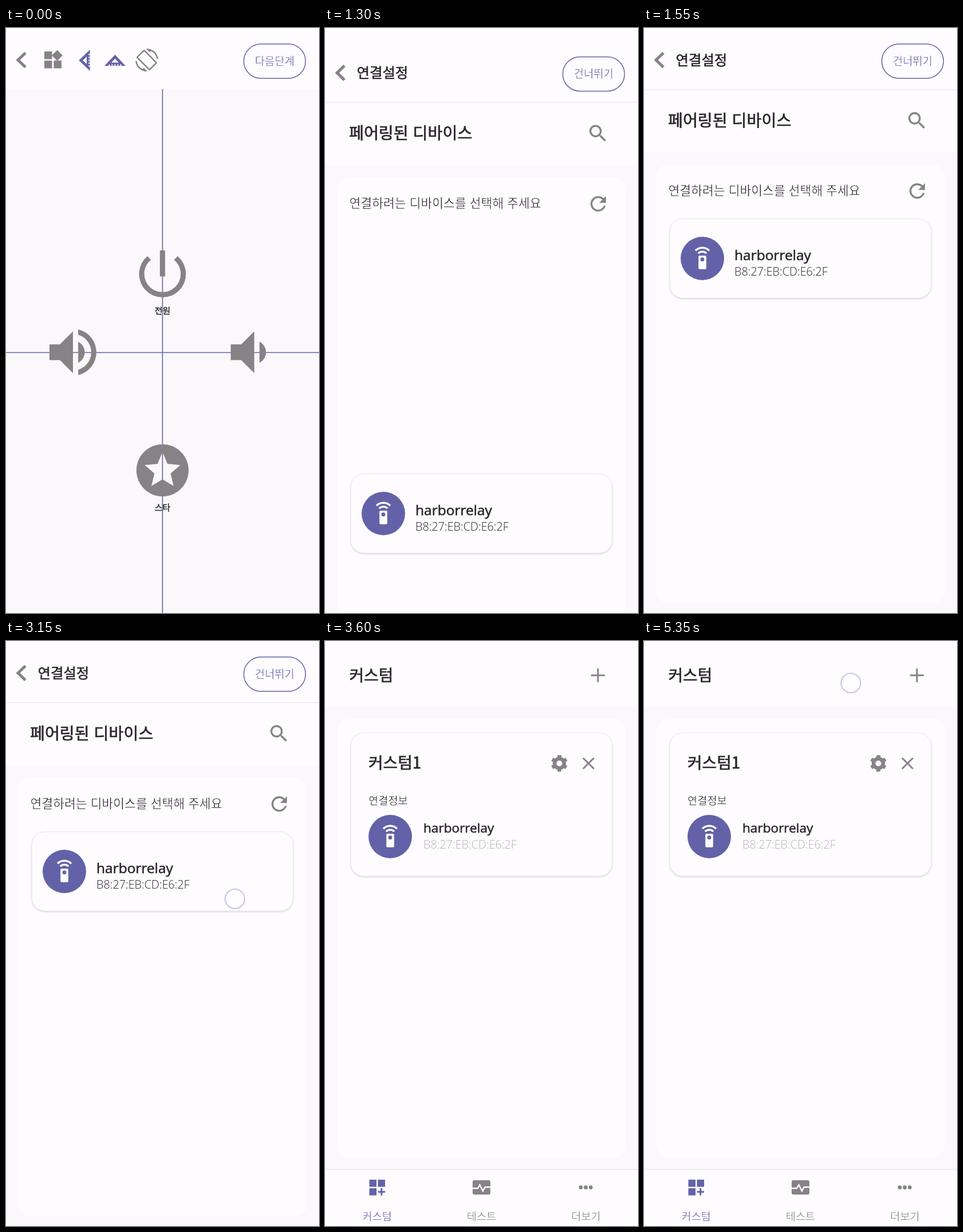
An HTML page for the animation above (5.4 s loop, 547 by 1023 pixels).

```html
<!DOCTYPE html>
<html lang="ko">
<head>
<meta charset="utf-8">
<style>
  html, body { margin: 0; height: 100%; overflow: hidden; background: #faf8fb; }
  svg { display: block; width: 100vw; height: 100vh; }
  text { font-family: 'Noto Sans CJK KR', 'Noto Sans CJK', 'Noto Sans', sans-serif; }
  .latin { font-family: 'Open Sans', 'Noto Sans', sans-serif; }
  .card { fill: #fefcff; stroke: #efedf2; filter: drop-shadow(0 1.5px 1.5px #0003); }
  .bar { fill: #fefcff; filter: drop-shadow(0 0 1.5px #0003); }
  .line { fill: none; stroke: #858385; }
  .pressed { filter: drop-shadow(0 2px 3px #0003); }
</style>
</head>
<body>
<svg id="stage" viewBox="0 0 547 1023" preserveAspectRatio="none"></svg>
<script>
const GREY = '#858385', PURPLE = '#6362a8', WHITE = '#fefcff', BACK = '#faf8fb', INK = '#29272b';

// Icon outlines on a 24 unit grid
const ICONS = {
  power: 'M13 3h-2v10h2zm4.83 2.17-1.42 1.42C17.99 7.86 19 9.81 19 12a7 7 0 0 1-14 0c0-2.19 1.01-4.14 2.58-5.42L6.17 5.17A9 9 0 1 0 17.83 5.17z',
  loud: 'M3 9v6h4l5 5V4L7 9zm13.5 3c0-1.77-1.02-3.29-2.5-4.03v8.05c1.48-.73 2.5-2.25 2.5-4.02zM14 3.23v2.06a7 7 0 0 1 0 13.42v2.06a9 9 0 0 0 0-17.54z',
  quiet: 'M18.5 12c0-1.77-1.02-3.29-2.5-4.03v8.05c1.48-.73 2.5-2.25 2.5-4.02zM5 9v6h4l5 5V4L9 9z',
  star: 'M12 2a10 10 0 1 0 0 20a10 10 0 1 0 0-20zm4.23 16L12 15.45 7.77 18l1.12-4.81-3.73-3.23 4.92-.42L12 5l1.92 4.53 4.92.42-3.73 3.23z',
  remote: 'M15 9H9q-1 0-1 1v12q0 1 1 1h6q1 0 1-1V10q0-1-1-1zm-3 6a2 2 0 1 1 0-4a2 2 0 1 1 0 4zM7.05 6.05l1.41 1.41a5 5 0 0 1 7.08 0l1.41-1.41a7 7 0 0 0-9.9 0zM12 0C8.96 0 6.21 1.23 4.22 3.22l1.41 1.41a9 9 0 0 1 12.73 0l1.41-1.41C17.79 1.23 15.04 0 12 0z',
  search: 'M15.5 14h-.79l-.28-.27A6.5 6.5 0 1 0 13.73 14.43l.27.28v.79l5 4.99L20.49 19zm-6 0a4.5 4.5 0 1 1 0-9a4.5 4.5 0 1 1 0 9z',
  refresh: 'M17.65 6.35A8 8 0 1 0 19.73 14h-2.08A6 6 0 1 1 16.22 7.78L13 11h7V4z',
  rotate: 'M16.48 2.52A10.5 10.5 0 0 1 22.45 11h1.5A12 12 0 0 0 12 0l-.66.03 3.81 3.81zM10.23 1.75a1.5 1.5 0 0 0-2.12 0L1.75 8.11a1.5 1.5 0 0 0 0 2.12l12.02 12.02a1.5 1.5 0 0 0 2.12 0l6.36-6.36a1.5 1.5 0 0 0 0-2.12zm4.6 19.44L2.81 9.17l6.36-6.36 12.02 12.02zM7.52 21.48A10.5 10.5 0 0 1 1.55 13H.05A12 12 0 0 0 12 24l.66-.03-3.81-3.81z',
  ruler: 'M12 2 31 22H-7zm0 7L5.4 16.2H18.6z'
};

const rect = (x, y, w, h, fill, extra = '') =>
  `<rect x="${x}" y="${y}" width="${w}" height="${h}" fill="${fill}" ${extra}/>`;
const stroke = (d, width, color = GREY) => `<path class="line" d="${d}" style="stroke:${color};stroke-width:${width}"/>`;
const icon = (name, cx, cy, scale, color = GREY) =>
  `<path d="${ICONS[name]}" fill="${color}" fill-rule="evenodd" transform="translate(${cx} ${cy}) scale(${scale}) translate(-12 -12)"/>`;

// An outline in ink thickens the regular face, one in the background colour thins it
const text = (str, x, y, size, weight, color = INK, extra = '') => {
  const [edge, width] = weight > 400 ? [color, size * .025] : weight < 400 ? [WHITE, size * .02] : ['none', 0];
  return `<text x="${x}" y="${y}" font-size="${size}" fill="${color}" stroke="${edge}" stroke-width="${width}" ${extra}>${str}</text>`;
};
const centered = (str, x, y, size, weight, color) => text(str, x, y, size, weight, color, 'text-anchor="middle"');
const hostName = (x, y, size) => text('harborrelay', x, y, size, 500, INK, 'class="latin"');
const address = (x, y, color) => text('B8:27:EB:CD:E6:2F', x, y, 19.8, 400, color, 'class="latin" font-weight="300"');
const card = (y, h) => `<rect class="card" x="45.5" y="${y}" width="456" height="${h}" rx="22"/>`;
const panel = y => rect(21.5, y, 504, 767, WHITE, 'rx="22"');

const backArrow = stroke('M34 43.5 21 56 34 68.5', 5);
const button = (label, id) =>
  `<g id="${id}"><rect x="415.5" y="28" width="108" height="60" rx="30" fill="${WHITE}" stroke="${PURPLE}" stroke-width="1.5"/></g>`
  + centered(label, 469.5, 64.5, 18.8, 300, PURPLE);
const device = (x, y) => `<circle cx="${x}" cy="${y}" r="38" fill="${PURPLE}"/>` + icon('remote', x, y, 1.7, WHITE);

const ruler = (cx, cy, angle) => `<g transform="translate(${cx} ${cy}) rotate(${angle})">`
  + icon('ruler', 0, 0, .97, PURPLE)
  + [-10, -5, 0, 5, 10].map(x => rect(x - 1, 7, 2, 3, WHITE)).join('') + '</g>';

const editor = rect(0, 0, 547, 1023, BACK) + rect(0, 0, 547, 107, WHITE) + backArrow
  + rect(67, 41, 13.5, 13.5, GREY) + rect(67, 57, 13.5, 13.5, GREY) + rect(83.5, 57, 13.5, 13.5, GREY)
  + `<path d="M89.5 38.5 99 48 89.5 57.5 80 48z" fill="${GREY}"/>`
  + ruler(137, 56.5, -90) + ruler(190.5, 56.5, 0) + icon('rotate', 246, 56, 1.66)
  + button('다음단계', 'next')
  + stroke('M273.5 107V1023M0 567.5H547', 1.6, '#6165a2')
  + icon('power', 273.5, 430, 4.55) + centered('전원', 273.5, 500, 15, 500)
  + icon('loud', 117, 567, 4.56) + icon('quiet', 424.7, 567, 4.56)
  + icon('star', 273.5, 773.5, 4.56) + centered('스타', 273.5, 844, 15, 500);

const pairing = rect(0, 0, 547, 1123, BACK) + rect(0, -100, 547, 317, WHITE)
  + '<rect class="bar" y="-100" width="547" height="207"/>'
  + backArrow + text('연결설정', 55.5, 64.5, 24.4, 500) + button('건너뛰기', 'skip')
  + text('페어링된 디바이스', 42, 171.5, 28.2, 500) + icon('search', 477, 162, 1.66)
  + panel(239) + text('연결하려는 디바이스를 선택해 주세요', 42.5, 292, 21.55, 300) + icon('refresh', 477.5, 285, 1.69)
  + '<g id="found">' + card(334, 138) + device(102, 403) + hostName(158, 406, 24.5) + address(158, 433) + '</g>';

const gear = `<g class="line" transform="translate(409.5 214)"><circle r="8.3" stroke-width="6.5"/>
  <circle r="12" stroke-width="5" pathLength="12" stroke-dasharray="1" transform="rotate(15)"/></g>`;

const home = rect(0, 0, 547, 1023, BACK) + rect(0, 0, 547, 114.5, WHITE)
  + text('커스텀', 42.5, 69.5, 27.8, 500) + stroke('M465 60H489M477 48V72', 3)
  + panel(136.5) + card(161, 250)
  + text('커스텀1', 76, 223, 27.8, 500) + gear + stroke('M451 204.5 470 223.5M470 204.5 451 223.5', 3)
  + text('연결정보', 76, 286, 18.7, 300) + device(114, 342)
  + hostName(172, 335, 22.6) + address(172, 363, '#b4b2b6')
  + '<rect class="bar" y="925" width="547" height="110"/>'
  + rect(77.5, 942, 12.5, 12.5, PURPLE) + rect(92.5, 942, 12.5, 12.5, PURPLE) + rect(77.5, 957, 12.5, 12.5, PURPLE)
  + stroke('M92.5 963.3H105M98.7 957V969.5', 3, PURPLE)
  + rect(258, 943, 31, 25, GREY, 'rx="3"') + stroke('M258 957H267L270.5 951 276 962 279.5 955H289', 2.3, WHITE)
  + [447, 455.7, 464.4].map(x => `<circle cx="${x}" cy="955.5" r="3.4" fill="${GREY}"/>`).join('')
  + centered('커스텀', 91, 1012.5, 18.7, 300, PURPLE) + centered('테스트', 273.5, 1012.5, 18.7, 300, GREY)
  + centered('더보기', 456, 1012.5, 18.7, 300, GREY);

const el = id => document.getElementById(id);
el('stage').innerHTML = `<g id="editor">${editor}</g><g id="home">${home}</g><g id="pairing">${pairing}</g>
  <circle id="touch" r="17" fill="#fefcff" fill-opacity=".4" stroke="#c6c6e6" stroke-width="2.2"/>`;

const LOOP = 5400, STEP = 50;
const TAPS = [
  { from: 50, to: 700, x: 203, y: 74.5 },
  { from: 1000, to: 1200, x: 496, y: 71 },
  { from: 3150, to: 3350, x: 400, y: 451 },
  { from: 5200, to: 5500, x: 361.5, y: 73.5 }
];
const progress = (t, from, to) => Math.min(1, Math.max(0, (t - from) / (to - from)));
const easeOut = (p, power) => 1 - (1 - p) ** power;
const show = (id, on) => el(id).setAttribute('visibility', on ? 'visible' : 'hidden');
const shift = (id, y) => el(id).setAttribute('transform', `translate(0 ${y})`);

function draw(t) {
  const opening = easeOut(progress(t, 1220, 1570), 5);
  const closing = progress(t, 3400, 3580);
  show('editor', t < 1300);
  show('home', t >= 3350);
  show('pairing', t >= 1220 && t < 3580);
  el('pairing').setAttribute('opacity', progress(t, 1210, 1290) * (1 - closing));
  shift('pairing', 82 * (1 - opening + closing));
  shift('found', 732 * (1 - easeOut(progress(t, 1250, 1550), 3)));
  el('next').setAttribute('class', t >= 1000 && t < 1250 ? 'pressed' : '');

  const tap = TAPS.find(({ from, to }) => t >= from && t < to);
  show('touch', tap);
  if (tap) {
    el('touch').setAttribute('transform', `translate(${tap.x} ${tap.y})`);
    el('touch').setAttribute('opacity', Math.min(1, (tap.to - t) / 150));
  }
}

const start = performance.now();
function frame() {
  const t = (performance.now() - start) % LOOP;
  draw(Math.floor(t / STEP) * STEP);
  requestAnimationFrame(frame);
}
frame();
</script>
</body>
</html>
```
